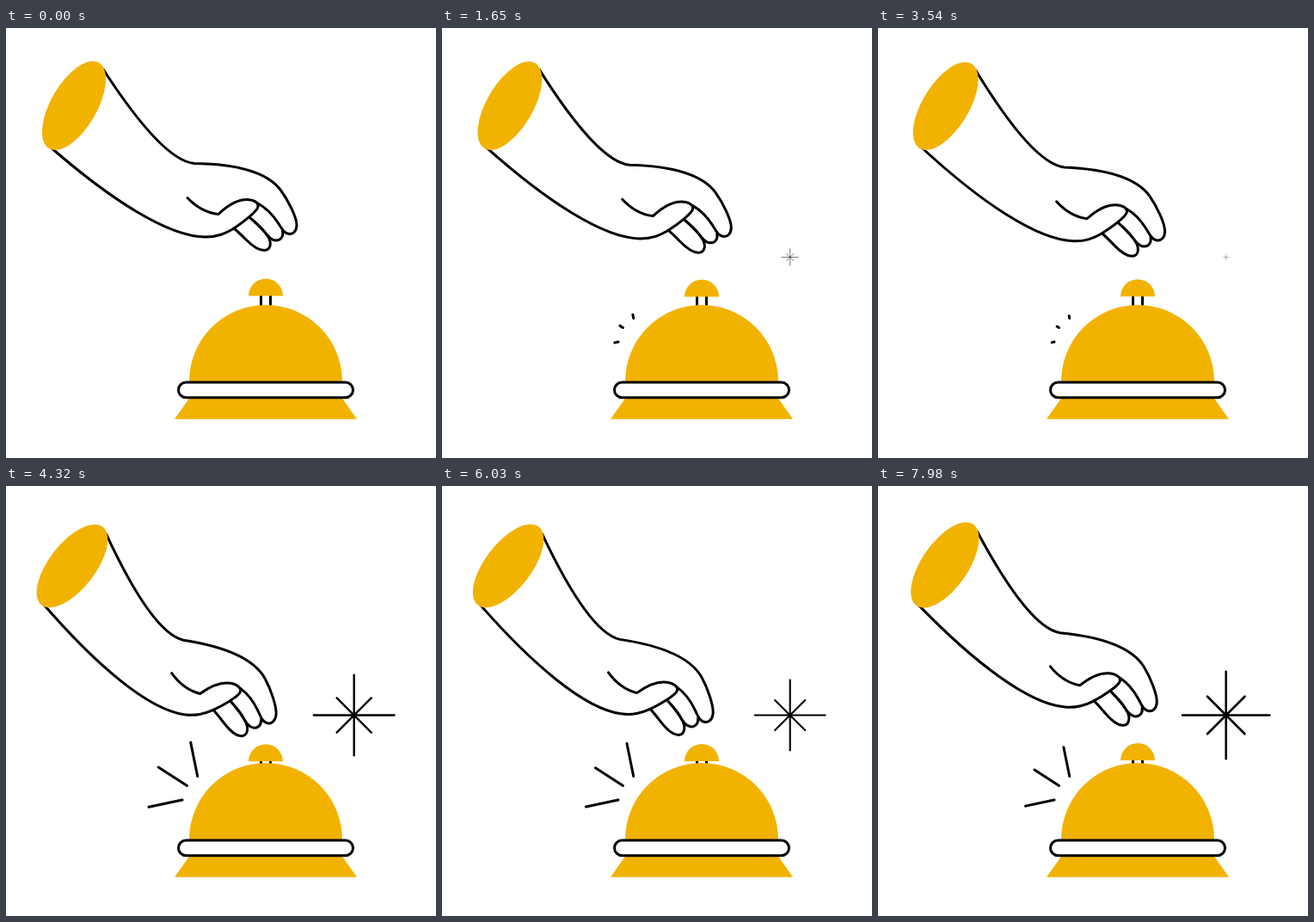
An HTML page with a canvas for the animation above (8 s loop, 500 px wide and 500 px high).

```html
<!DOCTYPE html>
<html lang="en">
<head>
<meta charset="utf-8">
<title>Service bell</title>
<style>
  html, body { margin: 0; width: 100%; height: 100%; overflow: hidden; background: #fff; }
  canvas { display: block; width: 100vw; height: 100vh; }
</style>
</head>
<body>
<canvas id="stage" width="500" height="500"></canvas>
<script>
const ctx = document.getElementById('stage').getContext('2d');
const GOLD = '#f2b200', INK = '#000', PAPER = '#fff';
const LOOP = 8000, STEP = 30;

const ARM = new Path2D(
  'M113 48 C150 105 190 155 219 157.5 C262 158 302 166 319 188 ' +
  'C328 200 338 220 338 229 C338 236 334 239.5 330 239.5 ' +
  'C324 239.5 321 234 316 226 C310 217 302 209 293 204 ' +
  'M50 137 C123 201 190 243 232 243 C246 243 255 239 265 233');
const FINGERS = new Path2D(
  'M321.5 236 C323 243 319 247 314 247 C308 247 304 241 299 235 C294 229 289 225 283 220 ' +
  'C290 226 300 235 305 243 C309 250 308 258.5 300 258.5 ' +
  'C293 258.5 285 252 279 246 C274 241 270 237 265 233');
const THUMB = new Path2D(
  'M211 197.5 C221 208 233 215 247 216.5 C259 205 270 199.5 280 199.5 ' +
  'C288 199.5 294 203 293 208 C292 213 277 225 265 233');

// inner end x, y and full reach dx, dy
const RAYS = [
  [205, 365, -40.4, 8.6],
  [210.5, 348.5, -34.5, -22.3],
  [222.7, 337.5, -8.3, -40.8]
];

// Linear there-and-back wave from 0 to 1
function wave(t, period) {
  const p = (((t % period) + period) % period) / period;
  return 1 - Math.abs(1 - 2 * p);
}

function line(x1, y1, x2, y2) {
  ctx.beginPath();
  ctx.moveTo(x1, y1);
  ctx.lineTo(x2, y2);
  ctx.stroke();
}

function drawHand(angle) {
  ctx.save();
  ctx.translate(58, 77);
  ctx.rotate(angle * Math.PI / 180);
  ctx.translate(-58, -77);
  [ARM, FINGERS, THUMB].forEach(path => ctx.stroke(path));
  ctx.fillStyle = GOLD;
  ctx.beginPath();
  ctx.ellipse(79, 90.2, 57.7, 26.8, -Math.PI / 3, 0, Math.PI * 2);
  ctx.fill();
  ctx.restore();
}

function drawBell(press) {
  ctx.lineCap = 'butt';
  line(296.5, 308, 296.5, 324);
  line(307.5, 308, 307.5, 324);
  ctx.lineCap = 'round';

  ctx.fillStyle = GOLD;
  ctx.beginPath();
  ctx.arc(302, 311.6 + 9 * press, 20, Math.PI, 0);
  ctx.fill();
  ctx.beginPath();
  ctx.arc(302, 411, 89, Math.PI, 0);
  ctx.fill();
  ctx.beginPath();
  ctx.moveTo(213.5, 430);
  ctx.lineTo(390.5, 430);
  ctx.lineTo(408, 454.7);
  ctx.lineTo(196, 454.7);
  ctx.fill();

  ctx.fillStyle = PAPER;
  ctx.beginPath();
  ctx.roundRect(200.5, 412, 203, 17.7, 8.8);
  ctx.fill();
  ctx.stroke();
}

function drawRays(reach) {
  if (!reach) return;
  for (const [x, y, dx, dy] of RAYS) line(x, y, x + dx * reach, y + dy * reach);
}

function drawSparkle(scale) {
  if (!scale) return;
  ctx.save();
  ctx.translate(404.7, 266.5);
  ctx.scale(scale, scale);
  for (let i = 0; i < 4; i++) {
    const r = i % 2 ? 35.5 : 58.5;
    line(-r, 0, r, 0);
    ctx.rotate(Math.PI / 4);
  }
  ctx.restore();
}

function draw(now) {
  const t = Math.floor((now % LOOP) / STEP) * STEP;
  ctx.fillStyle = PAPER;
  ctx.fillRect(0, 0, 500, 500);
  ctx.strokeStyle = INK;
  ctx.lineWidth = 3;
  ctx.lineCap = ctx.lineJoin = 'round';

  const bell = wave(t, 1740);
  drawSparkle(wave(t, 1800));
  drawRays(bell);
  drawBell(bell);
  // The hand starts one step late
  drawHand(9 * wave(Math.max(0, t - STEP), 1680));
}

const start = performance.now();
function tick() {
  draw(performance.now() - start);
  requestAnimationFrame(tick);
}
tick();
</script>
</body>
</html>
```
